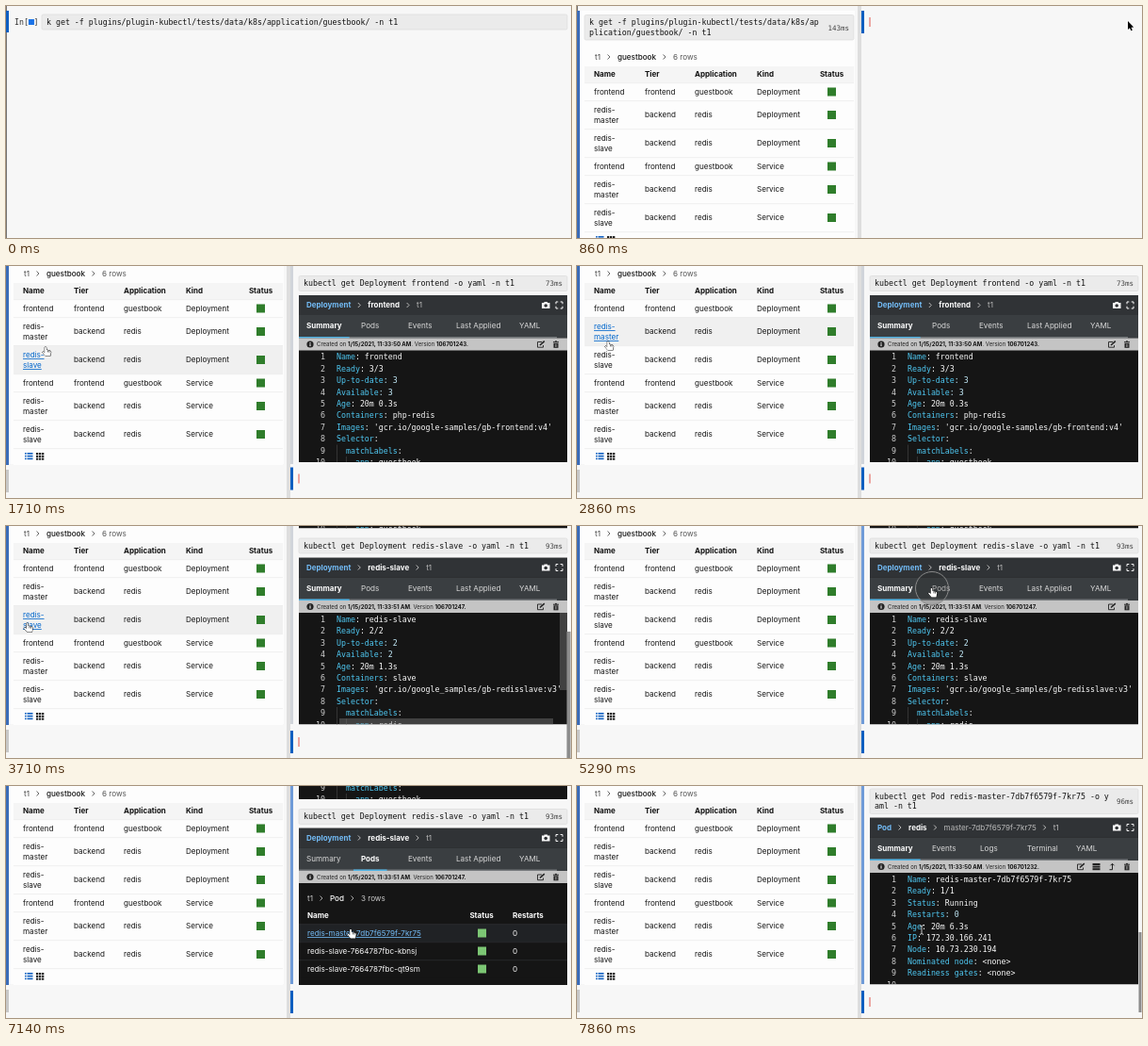
These frames come from a looping animation (600 px wide and 246 px high, 8 s). An HTML page with a canvas:

```html
<!DOCTYPE html>
<html lang="en">
<head>
<meta charset="utf-8">
<title>kubectl session</title>
<style>
html, body { margin: 0; width: 100%; height: 100%; overflow: hidden; background: #f7f7f7; }
canvas { display: block; width: 600px; height: 246px; }
</style>
</head>
<body>
<canvas id="stage"></canvas>
<script>
const LOOP = 8000, TICK = 1000 / 7;
const SANS = '8.1px Inter, sans-serif';
const MEDIUM = '500 8.1px Inter, sans-serif';
const BOLD = '700 8px Inter, sans-serif';
const SMALL = '6px Inter, sans-serif';
const SMALL_BOLD = '700 6px Inter, sans-serif';
const MONO = '8.28px "DejaVu Sans Mono", monospace';
const TINY_MONO = '7.5px "DejaVu Sans Mono", monospace';
const BLUE = '#0f5fc0', LINK = '#73bcf7', KEY = '#4fc8f2', WHITE = '#fafafa';

const canvas = document.getElementById('stage');
const scale = window.devicePixelRatio || 1;
canvas.width = 600 * scale;
canvas.height = 246 * scale;
const g = canvas.getContext('2d');
g.scale(scale, scale);

function rect(x, y, w, h, color) {
  g.fillStyle = color;
  g.fillRect(x, y, w, h);
}

// Text centred vertically on y; returns the x where it ends.
function text(s, x, y, color = '#151515', font = SANS, align = 'left') {
  g.font = font;
  g.fillStyle = color;
  g.textAlign = align;
  g.fillText(s, x, y + (font === SMALL || font === SMALL_BOLD ? 2.2 : 2.9));
  return x + g.measureText(s).width;
}

function line(points, color, width = 1) {
  g.strokeStyle = color;
  g.lineWidth = width;
  g.beginPath();
  points.forEach(([x, y]) => g.lineTo(x, y));
  g.stroke();
}

function clipped(x, y, w, h, draw) {
  g.save();
  g.beginPath();
  g.rect(x, y, w, h);
  g.clip();
  draw();
  g.restore();
}

function crumbs(items, x, y, chevron) {
  items.forEach(([s, color, font], i) => {
    if (i) {
      line([[x + 7.5, y - 2.5], [x + 10, y], [x + 7.5, y + 2.5]], chevron);
      x += 18;
    }
    x = text(s, x, y, color, font);
  });
}

function command(x, y, w, lines, time) {
  const h = 16 + 10.5 * (lines.length - 1);
  g.fillStyle = '#ebebeb';
  g.strokeStyle = '#dcdcdc';
  g.lineWidth = 0.7;
  g.beginPath();
  g.roundRect(x, y, w, h, 1.5);
  g.fill();
  g.stroke();
  lines.forEach((s, i) => text(s, x + 5, y + 8 + 10.5 * i, '#111', MONO));
  if (time) text(time, x + w - 5, y + h / 2, '#444', TINY_MONO, 'right');
}

const PARTS = [['frontend', 'frontend', 'guestbook'], ['redis-master', 'backend', 'redis'], ['redis-slave', 'backend', 'redis']];
const ROWS = ['Deployment', 'Service'].flatMap(kind => PARTS.map(part => [...part, kind]));

const inside = (c, x0, x1, y0, y1) => c && c.x >= x0 && c.x < x1 && c.y + 3 >= y0 && c.y + 3 < y1;

// Resource table; top is the bottom edge of its command box.
function table(top, wide, c) {
  const col = x => wide ? 47 + (x - 18) * 1.95 : x;
  const left = wide ? 38 : 8, width = wide ? 558 : 286;
  rect(left, top + 4, width, 220, '#fdfdfd');
  rect(left, top + 28, width, 17.5, '#f5f5f5');
  crumbs([['t1', '#444'], ['guestbook', '#151515', MEDIUM], ['6 rows', '#555']], col(18) + 1, top + 18, '#666');
  ['Name', 'Tier', 'Application', 'Kind'].forEach((s, i) => text(s, col([18, 72, 125, 191][i]), top + 36.5, '#111', BOLD));
  text('Status', col(270.5), top + 36.5, '#111', BOLD, 'center');
  let y = top + 45.5;
  ROWS.forEach(row => {
    const parts = wide ? [row[0]] : row[0].split(/(?<=-)/);
    const h = parts.length > 1 ? 30 : 19, mid = y + h / 2;
    const hover = inside(c, left, left + width, y, y + h);
    const onLink = hover && c.x < col(52);
    rect(left, y, width, h, hover ? '#f0f0f0' : '#fdfdfd');
    rect(left, y, width, 0.6, '#e6e6e6');
    parts.forEach((s, i) => {
      const ty = mid + (parts.length > 1 ? i * 11 - 5.5 : 0);
      const end = text(s, col(18), ty, hover ? '#0066cc' : '#151515');
      if (onLink) rect(col(18), ty + 4, end - col(18), 0.8, '#0066cc');
    });
    row.slice(1).forEach((s, i) => text(s, col([72, 125, 191][i]), mid));
    rect(col(270.5) - 4.5, mid - 4.5, 9, 9, '#2f7d2b');
    y += h;
  });
  rect(left, y, width, 0.6, '#e6e6e6');
  for (let i = 0; i < 3; i++) {
    const iy = y + 4.5 + i * 2.8;
    rect(col(18) + 2, iy, 1.6, 1.6, BLUE);
    rect(col(18) + 4.5, iy, 6, 1.6, BLUE);
    for (let j = 0; j < 3; j++) rect(col(18) + 14 + j * 3, iy, 2.3, 2.1, '#222');
  }
}

function trash(x, y) {
  rect(x - 3, y - 2.8, 6, 1, '#222');
  rect(x - 1, y - 3.6, 2, 1, '#222');
  rect(x - 2.5, y - 1.2, 5, 5, '#222');
  rect(x - 1, y - 0.4, 0.5, 3.4, '#c4c4c4');
  rect(x + 0.6, y - 0.4, 0.5, 3.4, '#c4c4c4');
}

function pencil(x, y) {
  line([[x + 1, y - 2.5], [x - 3.5, y - 2.5], [x - 3.5, y + 3.2], [x + 2.5, y + 3.2], [x + 2.5, y + 1]], '#222', 0.9);
  line([[x - 1, y + 1], [x + 3.8, y - 3.3]], '#222', 1.6);
}

function toolbar(y, [time, version], isPod) {
  rect(311, y - 6.5, 285, 13, '#c4c4c4');
  g.fillStyle = '#222';
  g.beginPath();
  g.arc(323, y, 3.6, 0, 7);
  g.fill();
  rect(322.5, y - 2, 1, 1, '#fff');
  rect(322.5, y - 0.5, 1, 2.6, '#fff');
  let x = text('Created on ', 330, y, '#222', SMALL);
  x = text(`1/15/2021, ${time} AM`, x, y, '#111', SMALL_BOLD);
  x = text('. Version ', x, y, '#222', SMALL);
  text(version + '.', x, y, '#111', SMALL_BOLD);
  pencil(isPod ? 535 : 568, y);
  trash(584, y);
  if (isPod) {
    for (let i = 0; i < 3; i++) rect(547.5, y - 3.5 + i * 2.6, 8, 2, '#222');
    line([[565.5, y + 3.2], [568.5, y + 3.2], [568.5, y - 3]], '#222');
    line([[566.5, y - 1.2], [568.5, y - 3.2], [570.5, y - 1.2]], '#222');
  }
}

function codeLines(lines, y) {
  lines.forEach((s, i) => {
    const ly = y + i * 12.4;
    const [, indent, key, value] = s.match(/^( *)([^:]*)(.*)$/);
    text(String(i + 1), 339, ly, '#d0d0d0', MONO, 'right');
    for (let k = 0; k < indent.length; k += 2) rect(351 + k * 4.98, ly - 6.2, 0.6, 12.4, '#4a4a4a');
    const x = text(key, 351 + indent.length * 4.98, ly, KEY, MONO);
    text(value, x, ly, /^: \d+$/.test(value) ? '#c4ebfa' : WHITE, MONO);
  });
}

const PODS = ['redis-master-7db7f6579f-7kr75', 'redis-slave-7664787fbc-kbnsj', 'redis-slave-7664787fbc-qt9sm'];

function podTable(p, c) {
  crumbs([['t1', '#ccc'], ['Pod', '#fff', MEDIUM], ['3 rows', '#ccc']], 320, p + 74.5, '#aaa');
  text('Name', 320, p + 93, '#fff', BOLD);
  text('Status', 505, p + 93, '#fff', BOLD, 'center');
  text('Restarts', 538, p + 93, '#fff', BOLD);
  PODS.forEach((name, i) => {
    const y = p + 111.5 + i * 19;
    const hover = inside(c, 311, 596, y - 9.5, y + 9.5);
    rect(311, y - 9.5, 285, 19, hover ? '#202225' : '#151515');
    rect(311, y - 9.5, 285, 0.6, '#303236');
    const end = text(name, 320, y, hover ? LINK : WHITE);
    if (hover && c.x < 445) rect(320, y + 4, end - 320, 0.8, LINK);
    rect(501, y - 4.5, 9, 9, '#7cc674');
    text('0', 538, y, WHITE);
  });
}

const KIND_TABS = [['Summary', 319], ['Pods', 377], ['Events', 427], ['Last Applied', 478], ['YAML', 545]];
const POD_TABS = [['Summary', 319], ['Events', 377], ['Logs', 428], ['Terminal', 478], ['YAML', 530]];
const deployment = (name, n, age, container, image, app, stamp) => ({
  path: [['Deployment', LINK, BOLD], [name, '#fff', BOLD], ['t1', '#bbb']], stamp, tabs: KIND_TABS,
  code: ['Name: ' + name, `Ready: ${n}/${n}`, 'Up-to-date: ' + n, 'Available: ' + n, `Age: ${age}`, 'Containers: ' + container,
    `Images: 'gcr.io/${image}'`, 'Selector:', '  matchLabels:', '    app: ' + app]
});
const FRONTEND = deployment('frontend', 3, '20m 0.3s', 'php-redis', 'google-samples/gb-frontend:v4', 'guestbook', ['11:33:50', '106701243']);
const SLAVE = deployment('redis-slave', 2, '20m 1.3s', 'slave', 'google_samples/gb-redisslave:v3', 'redis', ['11:33:51', '106701247']);
const POD = {
  path: [['Pod', LINK, BOLD], ['redis', '#fff', BOLD], ['master-7db7f6579f-7kr75', '#bbb'], ['t1', '#bbb']],
  stamp: ['11:33:50', '106701232'], tabs: POD_TABS,
  code: ['Name: ' + PODS[0], 'Ready: 1/1', 'Status: Running', 'Restarts: 0', 'Age: 20m 6.3s', 'IP: 172.30.166.241',
    'Node: 10.73.230.194', 'Nominated node: <none>', 'Readiness gates: <none>', '']
};

function panel(p, item, showPods, c) {
  const h = showPods ? 166.5 : 177;
  clipped(311, p, 285, h, () => {
    rect(311, p, 285, h, '#151515');
    rect(311, p, 285, 21, '#303336');
    rect(311, p + 21, 285, 24.5, '#3a3e41');
    crumbs(item.path, 319, p + 10.5, '#bbb');
    rect(569, p + 8, 8.5, 6, WHITE);
    rect(571.5, p + 7, 3.5, 2, WHITE);
    g.fillStyle = '#303336';
    g.beginPath();
    g.arc(573.2, p + 11, 1.8, 0, 7);
    g.fill();
    [[-1, -1], [1, -1], [-1, 1], [1, 1]].forEach(([a, b]) => {
      const x = 587.5 + a * 3.5, y = p + 10.5 + b * 3.5;
      line([[x - a * 2.3, y], [x, y], [x, y - b * 2.3]], WHITE);
    });
    rect(311, p + 44, 274, 1.5, '#75797c');
    item.tabs.forEach(([s, x], i) => {
      const active = i === (showPods ? 1 : 0);
      const end = text(s, x, p + 32.5, active ? '#fff' : '#d8d8d8', active ? BOLD : SANS);
      if (active) rect(x - 8, p + 44, end - x + 16, 1.5, '#4fb4e6');
    });
    toolbar(p + 52, item.stamp, item === POD);
    if (showPods) podTable(p, c);
    else codeLines(item.code, p + 65.5);
  });
}

function prompt(y, caret) {
  rect(302, y, 3, 24, BLUE);
  if (caret) rect(310.5, y + 7, 1, 10, '#e2574c');
}

// Pointer path: tick, x, y.
const PATH = [[4, 592, 60], [6, 585, 16], [9, 100, 68], [10, 60.5, 79], [11, 42, 86], [13, 42, 86], [16, 386, 150],
  [20, 33, 80], [22, 33, 80], [24, 22.5, 103], [29, 22.5, 103], [34, 376.5, 66], [41, 376.5, 66], [49, 366, 152], [56, 366, 152]];
const CLICKS = [11, 24, 37, 51];

function pointerAt(n) {
  if (n < PATH[0][0]) return null;
  const i = PATH.findIndex(k => k[0] > n), [t0, x0, y0] = PATH[i - 1], [t1, x1, y1] = PATH[i];
  const u = (n - t0) / (t1 - t0), e = u * u * (3 - 2 * u);
  return { x: x0 + (x1 - x0) * e, y: y0 + (y1 - y0) * e };
}

function outline(points, fill, stroke) {
  g.beginPath();
  points.forEach(([x, y]) => g.lineTo(x, y));
  g.closePath();
  g.fillStyle = fill;
  g.strokeStyle = stroke;
  g.lineWidth = 0.9;
  g.lineJoin = 'round';
  g.stroke();
  g.fill();
}

function drawPointer(c, n, kind) {
  g.save();
  g.translate(c.x, c.y);
  if (CLICKS.includes(n)) {
    g.beginPath();
    g.arc(0.5, 0, 17.5, 0, 7);
    g.fillStyle = 'rgba(40,40,40,.2)';
    g.fill();
    g.strokeStyle = '#8a8a8a';
    g.lineWidth = 1;
    g.stroke();
  }
  if (kind === 'arrow') {
    outline([[0, 0], [0, 9], [2, 7.2], [3.4, 10.3], [4.8, 9.7], [3.5, 6.7], [6.2, 6.5]], '#000', '#fff');
  } else if (kind === 'hand') {
    outline([[-0.8, 0], [0.7, 0], [1, 3], [5.2, 4], [5.8, 5], [5, 9.5], [0, 9.5], [-3.4, 5.4], [-2.6, 4.6], [-0.8, 6]], '#fff', '#000');
    line([[2.4, 3.6], [2.4, 5.4]], '#000', 0.6);
    line([[4, 4], [4, 5.6]], '#000', 0.6);
  } else {
    line([[-2, -4.5], [0, -3.5], [2, -4.5]], '#ddd', 0.9);
    line([[0, -3.5], [0, 4.5]], '#ddd', 0.9);
    line([[-2, 5.5], [0, 4.5], [2, 5.5]], '#ddd', 0.9);
  }
  g.restore();
}

const GET_ALL = 'k get -f plugins/plugin-kubectl/tests/data/k8s/application/guestbook/ -n t1';
const getKind = name => [`kubectl get Deployment ${name} -o yaml -n t1`];
const GET_POD = [`kubectl get Pod ${PODS[0]} -o y`, 'aml -n t1'];

function wideView(n, c) {
  const busy = n < 1;
  rect(0, 5, 3, busy ? 23 : 207, BLUE);
  const end = text(busy ? 'In[' : 'In[1', 9, 17, '#333', MONO);
  if (busy) rect(end, 14, 6, 6, '#1a73e8');
  text(']', busy ? end + 5.5 : end, 17, '#333', MONO);
  command(38, 9, 558, [GET_ALL], busy ? '' : '143ms');
  if (busy) return;
  table(25, true, c);
  rect(0, 212, 600, 34, '#f7f7f7');
  rect(0, 214, 3, 23, BLUE);
  text('In[2]', 9, 225, '#333', MONO);
  rect(43, 220, 1, 10, '#e2574c');
}

function leftPane(n, c) {
  const shift = n < 11 ? 0 : -46;
  clipped(0, 0, 298, 246, () => {
    rect(3, 5 + shift, 292, 251, '#fdfdfd');
    rect(0, Math.max(0, 5 + shift), 3, shift ? 211 : 241, '#3b6cb8');
    command(8, 9.5 + shift, 286, [GET_ALL.slice(0, 49), GET_ALL.slice(49)], '143ms');
    table(36 + shift, false, c);
    if (shift) {
      rect(0, 211, 298, 35, '#f7f7f7');
      rect(0, 216, 3, 24, '#c8c8c8');
    }
  });
  rect(298, 0, 4, 246, '#dedede');
}

function rightPane(n, c) {
  if (n < 11) return prompt(5, true);
  const focused = n >= 37;
  rect(302, 0, 3, 210, focused ? '#6f9bd8' : '#d0d4da');
  if (n < 26) {
    command(311, 10.5, 285, getKind('frontend'), n > 11 && '73ms');
    if (n === 11) return;
    panel(31, FRONTEND);
    if (n < 25) prompt(213.5, true);
    else command(311, 218, 285, getKind('redis-slave'));
  } else if (n < 53) {
    const pods = n >= 38;
    panel(pods ? -163 : -174.5, FRONTEND);
    command(311, pods ? 24.5 : 13, 285, getKind('redis-slave'), '93ms');
    panel(pods ? 44.5 : 33.5, SLAVE, pods, c);
    if (n < 30) {
      rect(354, 204, 227, 6.5, 'rgba(130,130,130,.4)');
      rect(588, 92, 8, 82, 'rgba(130,130,130,.4)');
      rect(595.5, 112, 4, 134, '#8c8c8c');
    }
    if (n < 52) prompt(217, !focused);
    else command(311, 217, 285, GET_POD);
  } else {
    command(311, 3, 285, GET_POD, '96ms');
    panel(33.5, POD);
    rect(596.5, 155, 3, 85, '#8c8c8c');
    prompt(217, true);
  }
}

function pointerKind(c, n) {
  if (n < 6) return 'arrow';
  if (c.x < 52 && c.y > 70) return 'hand';
  if (c.x < 311 || n < 12) return 'arrow';
  if (c.y > 54 && c.y < 80) return 'hand';
  if (n >= 38 && n < 53) return c.y > 140 && c.x < 445 ? 'hand' : 'arrow';
  return c.y > 92 ? 'text' : 'arrow';
}

function draw(n) {
  const c = pointerAt(n);
  rect(0, 0, 600, 246, '#f7f7f7');
  rect(0, 0, 0.8, 246, '#555');
  if (n < 6) wideView(n, c);
  else {
    leftPane(n, c);
    rightPane(n, c);
  }
  if (c) drawPointer(c, n, pointerKind(c, n));
}

function tick() {
  draw(Math.floor((performance.now() % LOOP + 5) / TICK) % 56);
  requestAnimationFrame(tick);
}
tick();
</script>
</body>
</html>
```
